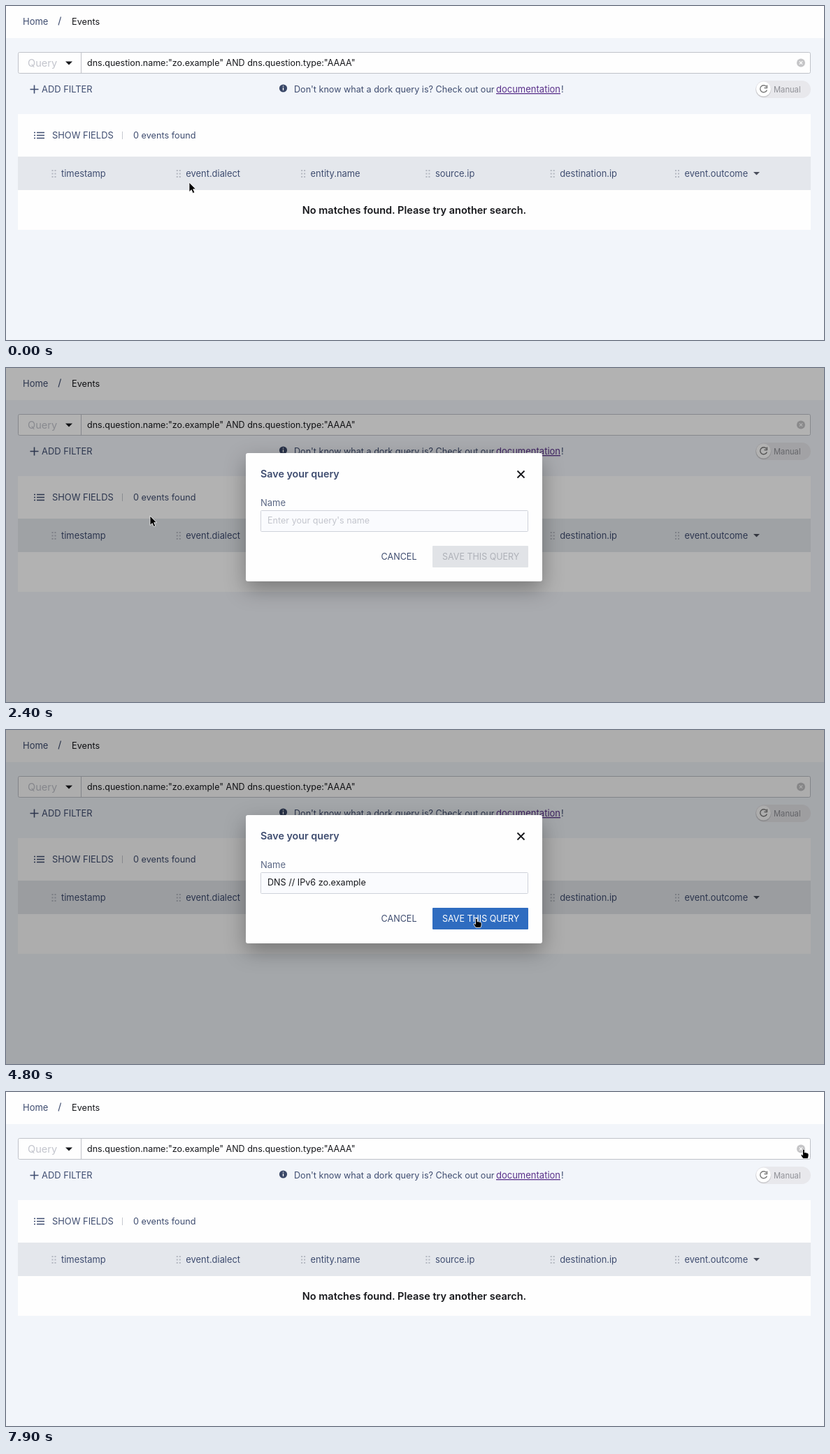
Write an HTML page that moves like this. It is 1170 px wide and 479 px high and loops after 8 s.

```html
<!DOCTYPE html>
<html lang="en">
<head>
<meta charset="utf-8">
<title>Save a query</title>
<style>
html, body { margin: 0; width: 100%; height: 100%; overflow: hidden; background: #f2f5fa; }
svg { display: block; width: 1170px; height: 479px; font: 400 12.9px Inter, sans-serif; }
text { fill: #3f4d70; white-space: pre; }
.dark { fill: #17181c; }
.bold { font-weight: 600; }
.pale { fill: #c3c5cd; }
.line { fill: none; stroke: #3f4d70; stroke-width: 1.6; }
#dialog { filter: drop-shadow(0 11px 15px rgba(0, 0, 0, .32)); }
#menu text { font: 400 11.7px "Noto Sans", sans-serif; fill: #2b2d30; }
#menu .off { fill: #96989a; }
#menu .on { fill: #fff; }
.key { text-decoration: underline; }
#arrow, #hand { fill: #000; stroke: #fff; stroke-width: .8; stroke-linejoin: round; }
</style>
</head>
<body>
<svg viewBox="0 0 1170 479">
  <rect width="1170" height="479" fill="#f2f5fa"/>
  <rect width="1170" height="46" fill="#fefefe"/>
  <text x="24" y="26.5" font-size="13">Home</text>
  <path class="line" d="M75 27.5 78.5 15.5" style="stroke-width:1.1"/>
  <text x="94" y="26.5" class="dark" font-size="12.7">Events</text>

  <rect x="17.5" y="66.5" width="1133" height="30" rx="2" fill="#fefefe" stroke="#bfc2c9"/>
  <path d="M107.5 67V96" stroke="#bfc2c9"/>
  <text x="31" y="87" class="pale" font-size="14.6">Query</text>
  <path d="M85 79.5h10l-5 5z" fill="#17181c"/>
  <text x="116" y="86" class="dark" font-size="12.5">dns.question.name:"zo.example" AND dns.question.type:"AAAA"</text>
  <circle cx="1137" cy="81.5" r="6" fill="#c5c5c7"/>
  <path d="M1134.8 79.3l4.4 4.4m0-4.4l-4.4 4.4" stroke="#fff" stroke-width="1.2"/>

  <path class="line" d="M34.5 119.5h12M40.5 113.5v12"/>
  <text x="51" y="124">ADD FILTER</text>
  <circle cx="396.5" cy="118" r="5.6" fill="#3a4868"/>
  <path d="M396.5 117v4M396.5 114.5v1.3" stroke="#fff" stroke-width="1.3"/>
  <text x="412" y="124" font-size="12.6">Don't know what a dork query is? Check out our</text>
  <text x="701" y="124" font-size="13" text-decoration="underline" style="fill:#59308a">documentation</text>
  <text x="794" y="124">!</text>
  <rect x="1072" y="107" width="79" height="25" rx="12.5" fill="#e8e8ec"/>
  <circle cx="1083.5" cy="120" r="11" fill="#000" opacity=".13"/>
  <circle cx="1083.5" cy="119" r="10.5" fill="#fff"/>
  <path d="M1087.5 115.5A5 5 0 1 0 1088.4 120.5M1088.5 113.5v4h-4" fill="none" stroke="#777" stroke-width="1.4"/>
  <text x="1098" y="123.5" font-size="11.2" style="fill:#8f9096">Manual</text>

  <rect x="17" y="155" width="1134" height="166" fill="#fefefe"/>
  <path class="line" d="M40 181.5h2m2 0h11M40 185.5h2m2 0h11M40 189.5h2m2 0h11"/>
  <text x="66" y="190">SHOW FIELDS</text>
  <path d="M166.5 180v11" stroke="#c5c8d0"/>
  <text x="182" y="190" font-size="12.7">0 events found</text>
  <rect x="17" y="216" width="1134" height="48" fill="#e4e7ec"/>
  <g id="columns"></g>
  <path d="M1069 238h9l-4.5 4.5z" fill="#4a4f5c"/>
  <text x="584" y="297.5" class="dark bold" font-size="14.5" text-anchor="middle">No matches found. Please try another search.</text>

  <rect id="shade" width="1170" height="479"/>

  <g id="dialog">
    <rect x="343" y="122" width="424" height="184" rx="3" fill="#fefefe"/>
    <text x="364" y="157" class="bold" font-size="14.3">Save your query</text>
    <path d="M731.5 147.5l10 10m0-10l-10 10" stroke="#17181c" stroke-width="1.8"/>
    <text x="364" y="198" font-size="13" style="fill:#5c6885">Name</text>
    <rect id="field" x="364.5" y="204.5" width="382" height="30" rx="1" fill="#fafbfe"/>
    <text id="value" x="374" y="223" font-size="12.6"></text>
    <path id="caret" d="M374.5 211v16" stroke="#17181c"/>
    <text x="536.5" y="275" font-size="12.6">CANCEL</text>
    <rect id="save" x="610" y="255" width="137" height="31" rx="1"/>
    <text id="saveText" x="624" y="275" font-size="12.5">SAVE THIS QUERY</text>
  </g>

  <g id="menu">
    <rect x="421" y="222" width="271" height="270" opacity=".18"/>
    <rect x="419.5" y="219.5" width="270" height="270" fill="#fdfdfd" stroke="#a9a9ab"/>
    <rect id="pick" x="420" width="269" height="23" fill="#3281de"/>
    <path d="M420 243.5h269m-269 93h269m-269 46h269m-269 23h269m-269 47h269" stroke="#dcdcde"/>
    <g id="items"></g>
    <rect x="425.5" y="388.5" width="12" height="12" rx="2" fill="#fff" stroke="#55575a"/>
    <circle cx="431.5" cy="465" r="6.5" fill="#2391ac"/>
    <path d="M679 461.5l4 4-4 4" fill="none" stroke="#333" stroke-width="1.5"/>
  </g>

  <path id="arrow" d="M0 0V13.5L3.2 10.7 5.3 15.5 7.8 14.4 5.7 9.7H9.5Z"/>
  <path id="hand" d="M-1.5 1Q0-.8 1.2 1V5Q2.5 4 3.5 5.2 4.7 4.5 5.3 5.8 7 5.5 7 7.5V10L5.8 13.5H-1L-4 9Q-4.3 7.3-2.8 7.5L-1.5 8.7Z"/>
</svg>
<script>
const $ = id => document.getElementById(id);
const show = (id, on) => $(id).style.display = on ? "" : "none";

$("columns").innerHTML = ["timestamp", "event.dialect", "entity.name", "source.ip", "destination.ip", "event.outcome"]
  .map((name, i) => {
    const x = 79 + 178.3 * i;
    const grip = [0, 4].map(dx => `M${x - 12.5 + dx} 235v11`).join("");
    return `<path d="${grip}" stroke="#b4b8c1" stroke-width="2" stroke-dasharray="2 2.5"/>
      <text x="${x}" y="244.5">${name}</text>`;
  }).join("");

// "_" marks the access key, "-" in front a disabled entry
const entries = [
  [232, "-Ann_uler"], [256, "_Couper"], [279, "Co_pier"], [302, "Co_ller"], [325, "-_Supprimer"],
  [348, "-_Tout sélectionner"], [371, "Ajouter un _mot-clé pour cette recherche…"],
  [395, "_Vérifier l’orthographe"], [419, "Inspecter les propriétés d’accessibilité"],
  [442, "Examiner l’élément"], [465, "Velbru Screenshot"]
];
$("items").innerHTML = entries.map(([y, label]) => {
  const off = label[0] === "-";
  const html = (off ? label.slice(1) : label).replace(/_(.)/, '<tspan class="key">$1</tspan>');
  return `<text x="443" y="${y + 4}" class="${off ? "off" : ""}">${html}</text>`;
}).join("");
const rows = [...$("items").children];

// Pointer path: time, x, y
const path = [
  [0, 262, 253], [200, 345, 275], [300, 374, 280], [500, 153, 173], [600, 153, 173],
  [1300, 89, 87], [1700, 89, 87], [1800, 158, 183], [1900, 158, 183], [2000, 179, 202],
  [2100, 179, 202], [2300, 171, 206], [2400, 206, 212], [2700, 385, 219], [3000, 419, 219],
  [3200, 419, 219], [3600, 450, 272], [3900, 459, 299], [4100, 465, 297], [4600, 673, 270],
  [7200, 673, 270], [7800, 1132, 86], [7900, 1141, 82]
];
// Backdrop and dialog opacity: time, value
const shades = [[2200, 0], [2300, .03], [2400, .3], [2600, .32], [4800, .32], [4900, .2], [5000, .09], [5100, .03], [5200, 0]];
const fades = [[2200, 0], [2300, .15], [2400, 1], [4800, 1], [4900, .13], [5000, 0]];

function at(keys, t, n = 1) {
  const i = keys.findIndex(k => k[0] > t);
  if (i < 0) return keys[keys.length - 1][n];
  if (i === 0) return keys[0][n];
  const a = keys[i - 1], b = keys[i];
  return a[n] + (b[n] - a[n]) * (t - a[0]) / (b[0] - a[0]);
}

function draw(t) {
  const x = at(path, t), y = at(path, t, 2);
  const fade = at(fades, t);
  const scale = t < 2400 ? .766 : 1;
  const focus = t >= 2900 && t < 4600;
  const pasted = t >= 4000;

  $("shade").setAttribute("opacity", at(shades, t));
  show("dialog", fade > 0);
  $("dialog").setAttribute("opacity", fade);
  $("dialog").setAttribute("transform", `translate(555 214) scale(${scale}) translate(-555 -214)`);
  $("field").setAttribute("stroke", focus ? "#17181c" : "#cfd2da");
  $("field").setAttribute("stroke-width", focus ? 1.5 : 1);
  $("value").textContent = pasted ? "DNS // IPv6 zo.example" : "Enter your query's name";
  $("value").setAttribute("class", pasted ? "dark" : "pale");
  show("caret", focus && !pasted);
  $("save").setAttribute("fill", pasted ? "#2f6cc0" : "#e1e3e7");
  $("saveText").style.fill = pasted ? "#fff" : "#aeb1b8";

  const open = t >= 3200 && t < 4000;
  show("menu", open);
  const hit = entries.findIndex(e => Math.abs(y - e[0]) < 11.5);
  const active = open && hit >= 0 && entries[hit][1][0] !== "-";
  show("pick", active);
  if (active) $("pick").setAttribute("y", entries[hit][0] - 12);
  rows.forEach((row, i) => row.classList.toggle("on", active && i === hit));

  const hand = t >= 4500 && t < 5100 || t >= 7900;
  show("hand", hand);
  show("arrow", !hand);
  $(hand ? "hand" : "arrow").setAttribute("transform", `translate(${x} ${y})`);
}

function tick() {
  draw(Math.floor(performance.now() % 8000 / 100) * 100);
  requestAnimationFrame(tick);
}
tick();
</script>
</body>
</html>
```
